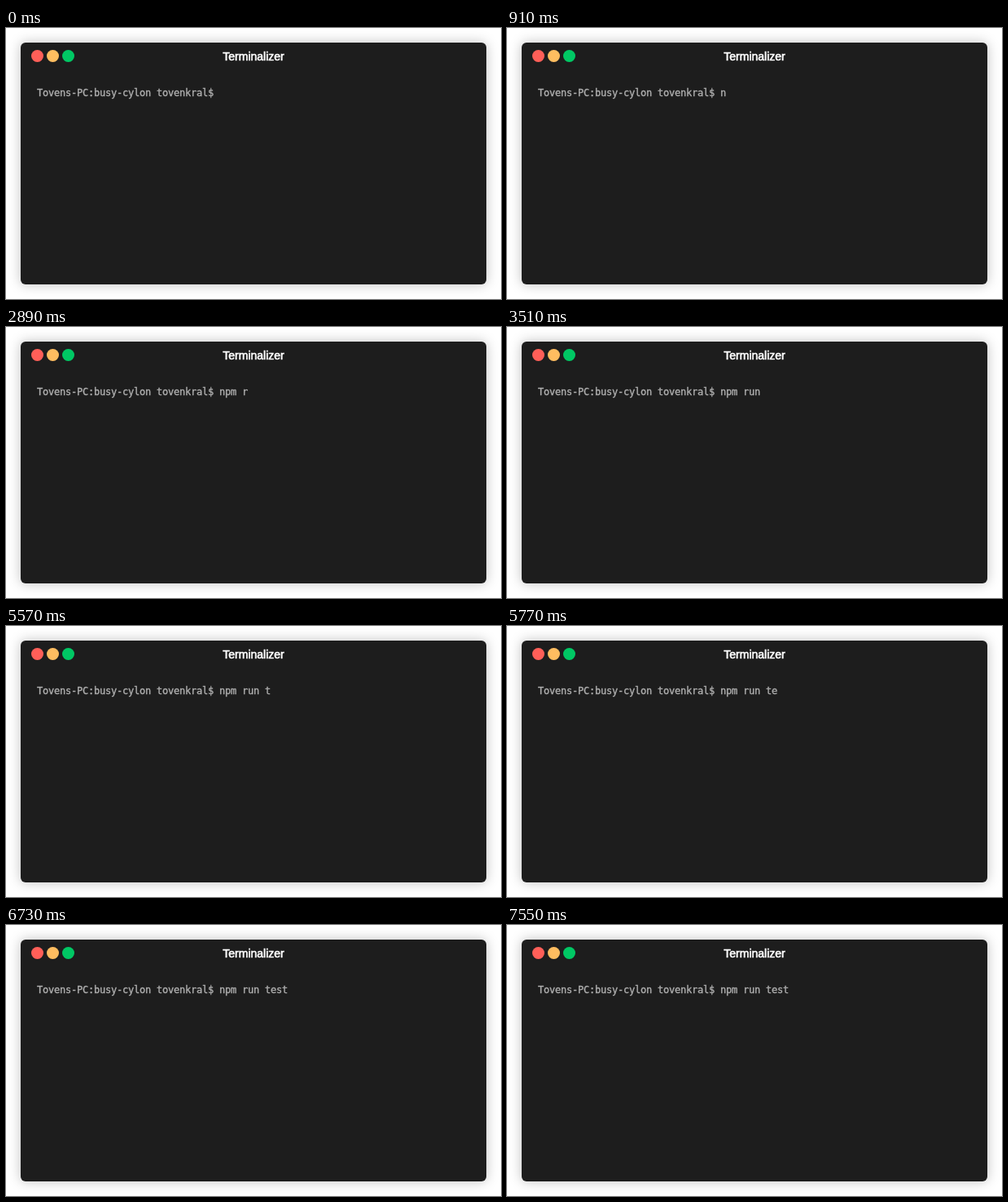
Animation, 608 px wide and 334 px high, one loop 8 s. Source, as an HTML page:

```html
<!DOCTYPE html>
<html lang="en">
<head>
<meta charset="utf-8">
<title>Terminal</title>
<style>
  html, body { margin: 0; width: 100%; height: 100%; overflow: hidden; background: #fff; }
  .window {
    position: absolute; left: 18px; top: 18px; width: 572px; height: 298px;
    border-radius: 6px; background: #1d1d1d; box-shadow: 0 0 15px rgba(0, 0, 0, .25);
  }
  svg { position: absolute; left: 0; top: 0; display: block; }
  .title {
    font: 14px "Liberation Sans", Arial, sans-serif;
    fill: #fff; stroke: #fff; stroke-width: .6px; text-anchor: middle;
  }
  .line {
    font: 12px "DejaVu Sans Mono", monospace; letter-spacing: -.224px;
    fill: #afafaf; stroke: #afafaf; stroke-width: .35px; white-space: pre;
  }
</style>
</head>
<body>
<div class="window"></div>
<svg width="608" height="334">
  <circle cx="38.5" cy="34.5" r="7.5" fill="#ff5f58"/>
  <circle cx="57.5" cy="34.5" r="7.5" fill="#ffbd60"/>
  <circle cx="76.5" cy="34.5" r="7.5" fill="#00c864"/>
  <text class="title" x="304" y="40">Terminalizer</text>
  <text class="line" id="line" x="38" y="84"></text>
</svg>
<script>
  const LOOP = 8000;
  const PROMPT = "Tovens-PC:busy-cylon tovenkral$ ";
  const COMMAND = "npm run test";
  // Time of each visible keystroke; a space arrives with the letter after it.
  const KEY_TIMES = [910, 1580, 1680, 2890, 2890, 3400, 3510, 5570, 5570, 5770, 6150, 6320];
  const line = document.getElementById("line");
  const start = performance.now();

  function draw(now) {
    const time = Math.max(0, now - start) % LOOP;
    const typed = KEY_TIMES.filter(key => key <= time).length;
    const text = PROMPT + COMMAND.slice(0, typed);
    if (line.textContent !== text) line.textContent = text;
    requestAnimationFrame(draw);
  }
  draw(start);
</script>
</body>
</html>
```
